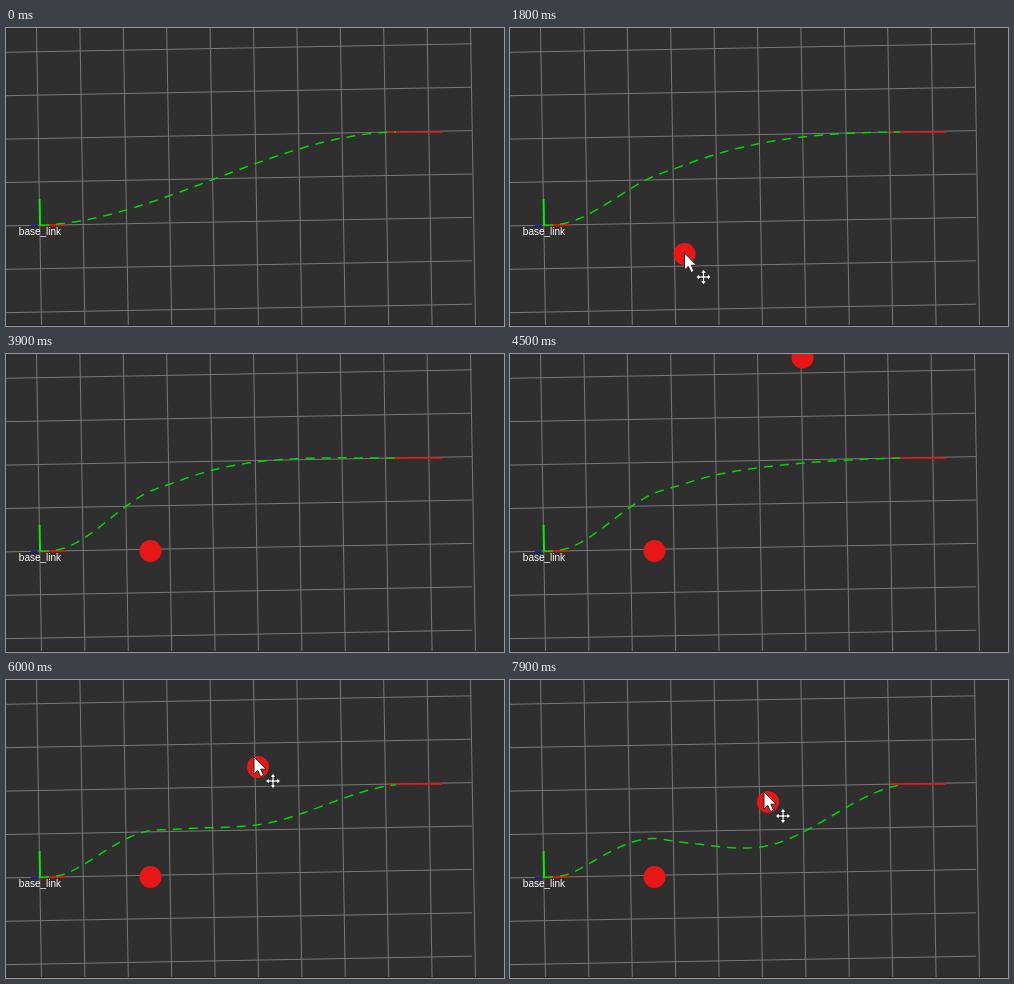
Animation of 498 by 298 pixels, one loop 8000 ms. Source, as an HTML page:

```html
<!DOCTYPE html>
<html lang="en">
<head>
<meta charset="utf-8">
<title>Path planning</title>
<style>
  html, body { margin: 0; width: 100%; height: 100%; overflow: hidden; background: #2f2f2f; }
  svg { display: block; width: 498px; height: 298px; }
  text { font: 10px "Liberation Sans", Arial, sans-serif; fill: #fff; }
</style>
</head>
<body>
<svg viewBox="0 0 498 298">
  <rect width="498" height="298" fill="#2f2f2f"/>
  <path id="grid" fill="none" stroke="#787878"/>
  <path d="M0 297.5H498" stroke="#2a2328"/>
  <path d="M25 197.8H32" stroke="#1818c0" stroke-width="1.5"/>
  <path d="M34 197.5L59 197" stroke="#e01010" stroke-width="1.8"/>
  <path d="M381 104L436 104.2" stroke="#dc1414" stroke-width="1.7"/>
  <path id="route" fill="none" stroke="#00d800" stroke-width="1.5" stroke-dasharray="9 7"/>
  <path d="M33.6 171L34 197" stroke="#00f000" stroke-width="2"/>
  <text x="34" y="207" text-anchor="middle">base_link</text>
  <circle id="first" r="11" fill="#e81717"/>
  <circle id="second" r="11" fill="#e81717"/>
  <g id="cursor" fill="#fff" stroke="#222" stroke-linejoin="round">
    <path d="M0 0V17L3.8 13.4L6.6 19.6L9.6 18.2L6.8 12.2H12Z"/>
    <path transform="translate(19 24)" stroke-width=".8"
      d="M0 -7.5L3 -4H1V-1H4V-3L7.5 0L4 3V1H1V4H3L0 7.5L-3 4H-1V1H-4V3L-7.5 0L-4 -3V-1H-1V-4H-3Z"/>
  </g>
</svg>
<script>
const LOOP = 8000, STEP = 100, CELL = 43.4;
const el = id => document.getElementById(id);
const clamp = v => Math.min(Math.max(v, 0), 1);
const mix = (a, b, k) => a + (b - a) * k;

// Obstacles are dragged in strokes; push is how far each one bends the route
const first = {
  from: { x: 240, y: 325, push: 0 },
  drags: [
    { start: 700, end: 900, x: 236, y: 318, push: 2.7 },
    { start: 1100, end: 1400, x: 208, y: 272, push: 15 },
    { start: 1500, end: 1800, x: 174.5, y: 226, push: 26.7 },
    { start: 1800, end: 2500, x: 144.5, y: 197, push: 38 }
  ]
};
const second = {
  from: { x: 330, y: -120, push: 0 },
  drags: [
    { start: 3800, end: 4500, x: 292.5, y: 3.5, push: 6.5 },
    { start: 4500, end: 4700, x: 280, y: 46, push: 17 },
    { start: 4700, end: 6000, x: 252, y: 87, push: 38 },
    { start: 6000, end: 6800, x: 243, y: 114, push: 51 },
    { start: 6800, end: 7900, x: 258, y: 122, push: 60 }
  ]
};

function locate({ from, drags }, t) {
  return drags.reduce((at, drag) => {
    const k = clamp((t - drag.start) / (drag.end - drag.start));
    return {
      x: mix(at.x, drag.x, k),
      y: mix(at.y, drag.y, k),
      push: mix(at.push, drag.push, k)
    };
  }, from);
}

function smooth(a, b, x) {
  const u = clamp((x - a) / (b - a));
  return u * u * (3 - 2 * u);
}

// An S-curve, lifted by the first obstacle and lowered by the second
function routeY(x, lift, drop) {
  return mix(197.5, 104, smooth(25, 393, x))
    - lift * smooth(47, 151, x) * smooth(392, 180, x)
    + drop * smooth(72, 250, x) * smooth(402, 250, x);
}

function drawRoute(lift, drop) {
  const points = [];
  for (let x = 34; x <= 390; x += 4) points.push(`${x} ${routeY(x, lift, drop).toFixed(2)}`);
  el("route").setAttribute("d", "M" + points.join("L"));
}

function place(id, x, y) {
  el(id).setAttribute("transform", `translate(${x} ${y})`);
}

function draw(time) {
  const t = Math.floor(time % LOOP / STEP) * STEP;
  const a = locate(first, t), b = locate(second, t);
  drawRoute(a.push, b.push);
  place("first", a.x, a.y);
  place("second", b.x, b.y);
  if (t < 3100) place("cursor", a.x, a.y - 1);
  else place("cursor", b.x - 4, b.y - 10);
  const shown = t >= 1200 && t < 3100 || t >= 4600;
  el("cursor").setAttribute("visibility", shown ? "visible" : "hidden");
}

function drawGrid() {
  let d = "";
  for (let i = 0; i < 7; i++) d += `M0 ${24.3 + CELL * i}L466 ${15.8 + CELL * i}`;
  for (let i = 0; i < 11; i++) d += `M${30.5 + CELL * i} 0L${35.5 + CELL * i} 298`;
  el("grid").setAttribute("d", d);
}

drawGrid();
const start = performance.now();
function tick() {
  draw(performance.now() - start);
  requestAnimationFrame(tick);
}
tick();
</script>
</body>
</html>
```
